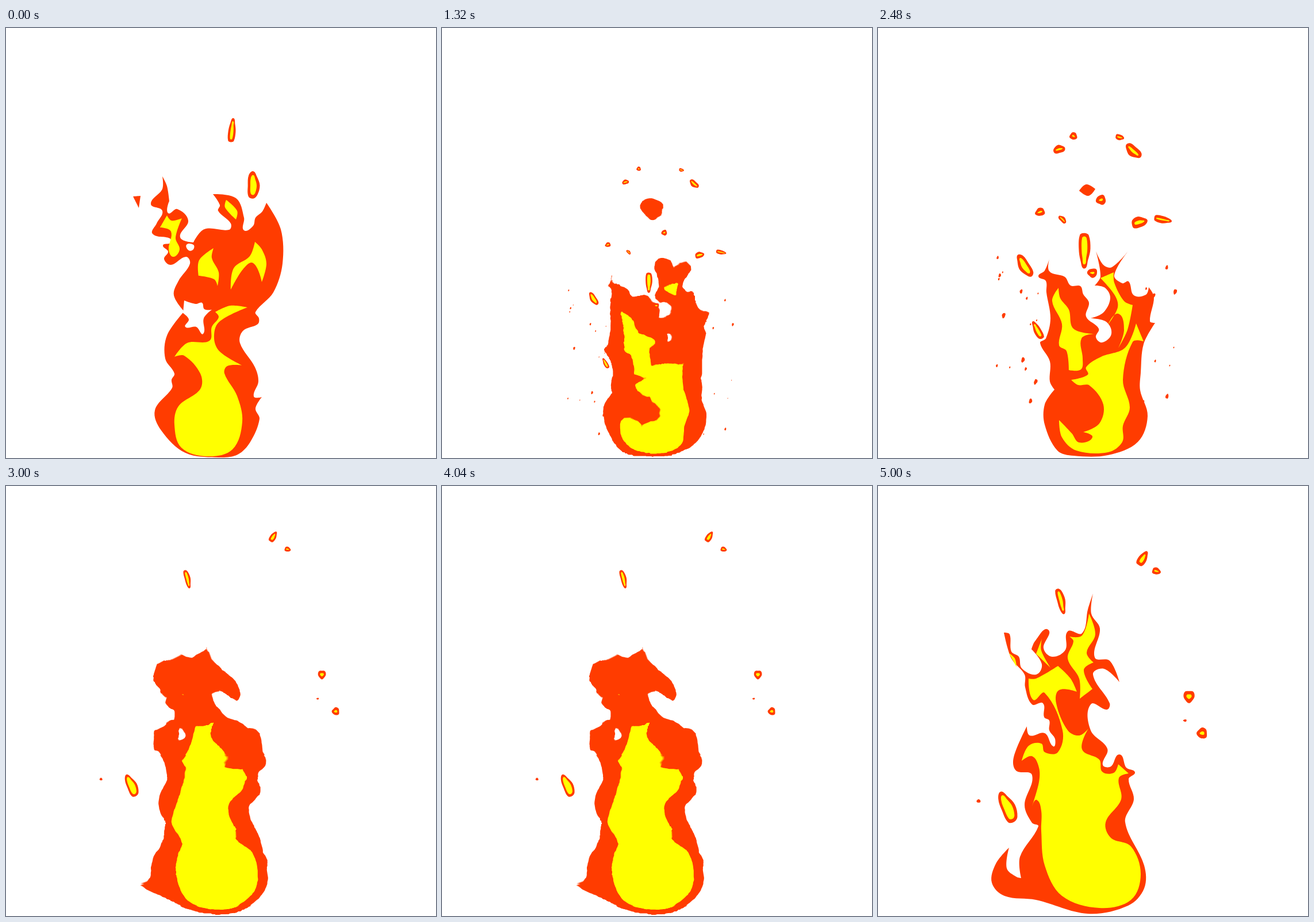
These frames come from a looping animation (748x748 px, 5.04 s). An HTML page with a canvas:

```html
<!DOCTYPE html>
<html lang="en">
<head>
<meta charset="utf-8">
<title>Flame</title>
<style>
  html, body { margin: 0; width: 100%; height: 100%; overflow: hidden; background: #fff; }
  canvas { display: block; width: 100vw; height: 100vh; }
</style>
</head>
<body>
<canvas id="stage" width="748" height="748"></canvas>
<script>
const SIZE = 748, HALF = 374, STEP = 40, LOOP = 5040, CYCLE = 26;
const RED = '#ff3c00', YELLOW = '#ffff00';

// Key drawings of one cycle. Outlines run smoothly through their points; "!" marks a corner.
// Embers: x,y,width,height,angle, shown from step "first" to "last" around the drawing.
const poses = [
  {
    at: 0, first: -1, last: 5, lift: 150, flecks: 0,
    red: [
      '453,304! 478,350 481,410 465,460 434,494 440,505 438,515 412,527 407,548 433,590 439,615 431,641 445,642! 434,662 441,680 425,720 403,742 370,747 312,739 270,700 259,665 289,626 288,612 293,601 277,575 280,535 310,493! 292,465 300,440 320,410 313,398 287,412 275,402 282,389 273,378 286,374 285,366 255,358 262,340 272,318 252,306 272,280 272,258! 280,275 284,301! 282,322 298,315 317,335 303,364 326,373! 345,350 388,351 391,340 369,318 372,308 360,289! 400,296 414,330 414,352 430,344 434,330 446,319',
      '221,293! 234,292! 231,313!'
    ],
    holes: [
      '314,377 326,377 326,385 318,387',
      '310,474! 330,480 341,478 345,489 358,490! 344,505 343,532 331,520 312,520 318,507 308,496!'
    ],
    yellow: [
      '361,383! 336,404 335,431! 362,437 368,449! 370,425 358,400',
      '433,372! 424,397 396,418 391,455! 412,420 430,409 445,442! 453,410 445,385',
      '383,299! 381,312 400,333! 402,318',
      '280,326! 268,347! 287,354 283,385 291,398 302,385 295,365 306,331! 288,335',
      '420,486! 370,512 362,540 372,563 411,587! 385,588 380,601 402,640 411,685 394,733 350,745 305,730 293,690 300,658 338,628 338,601 310,570 293,572! 315,548 354,544 358,520 370,503 364,494! 390,483'
    ],
    embers: '393,180,13,42,6 430,274,21,48,0'
  },
  {
    at: 10, first: -5, last: 6, lift: 170, flecks: 26,
    red: [
      '299,399! 298,423 325,433 335,448 352,449 357,463 367,478 362,502 384,523 379,538 390,547 406,532 397,511 370,505! 392,495 404,470 395,452 377,448! 387,432 379,388! 392,412 407,416 436,387! 411,430 425,444 436,441 445,465 466,464 471,451! 480,468 473,510 482,513! 462,550 457,600 456,630 469,675 452,720 400,743 340,744 312,735 290,690 290,655 307,629! 299,615 299,580 282,548 292,540 300,505 293,460 292,440 279,432 290,422',
      '350,283! 362,272 378,280! 366,292'
    ],
    holes: [],
    yellow: [
      '314,452! 317,470 332,490 340,523 376,532! 354,540 356,575 353,594 332,595! 328,562 315,552 320,515 303,475',
      '410,425! 411,443 428,475 443,482! 434,525 418,557! 428,525 418,497 400,516! 417,486 412,465 387,435!',
      '449,514! 462,545! 443,546 426,612 438,660 426,692 425,720 400,738 345,735 320,712 315,682! 337,705 350,721 373,712 357,703! 385,688 392,655 368,622 348,621 336,612! 365,603 362,590 388,572 430,556'
    ],
    embers: '315,211,21,14,-15 340,188,13,13,30 420,190,15,10,15 444,214,33,18,42 388,299,17,17,-20 282,320,17,14,-20 321,333,17,9,45 454,338,28,19,-15 494,333,31,13,12 359,384,20,62,0 373,426,17,16,0 255,414,19,44,-32 278,527,13,34,-28'
  },
  {
    at: 20, first: -5, last: 0, lift: 0, flecks: 0,
    red: [
      '334,171! 326,210 335,211! 338,235 364,285 350,310 364,319 373,345! 358,355 358,377 375,392 400,425 398,457 425,475 431,500 413,558 433,600 460,616 462,665 466,708 420,738 350,744 290,724 252,690 247,668 258,657 259,630 226,630! 253,613 224,575 229,560! 240,575 271,572 261,535 270,527 273,545 284,548 290,510 288,470 275,437 252,458 238,445 230,412 214,415! 224,390 224,343! 230,372 248,376 247,362 272,358 272,338 228,320 228,309 262,312 235,275 237,263 264,285 286,268 296,267 295,280 318,265 309,225 320,186! 322,196'
    ],
    holes: ['283,431! 315,452 316,490 303,490 304,465 292,460 298,455'],
    yellow: [
      '238,275! 268,295 283,279! 288,292 307,320 300,365 300,400 278,421! 276,392 260,370 280,362 280,330 245,316! 265,308',
      '233,375! 258,408 247,432! 242,408 226,400!',
      '321,200! 322,222 330,232 350,275 344,305 362,338 358,346! 345,328 312,319 310,283 322,262 311,222',
      '320,362! 350,366 373,418! 350,394 328,420 338,447 366,457 367,435! 397,465 425,500! 402,502 412,540 410,557 385,567 362,600 368,617 366,640 385,660 403,638 398,620 413,615 415,600 440,602 462,640 455,700 425,728 380,735 325,708 295,650 290,628 246,583! 278,583 280,558 298,545 300,510 335,517 348,490 322,435 320,405 327,385'
    ],
    embers: '284,46,12,6,5 191,81,21,8,-14 391,77,21,12,10 465,142,22,33,0 482,170,20,16,15 535,372,21,29,-15 530,410,8,7,0 556,434,22,27,0 171,436,5,6,0 195,474,5,6,0 181,556,10,13,0'
  },
  {
    at: 21, first: 0, last: 5, lift: 100, flecks: 0,
    red: [
      '374,187! 371,222 386,248 377,298 403,304 420,341! 393,318 374,328 403,378 398,389 370,380 370,425 399,457 391,485 405,488 420,467 432,490 447,498 436,510 445,545 430,585 463,660 463,700 435,730 365,744 275,720 220,713 198,690 205,657 228,629! 224,665 241,680 249,682! 247,645 279,592 268,586 255,555 268,503 240,495 236,472 259,418! 264,434 290,430 305,453 308,440 298,425 298,408 289,402 287,378 268,380 256,350 255,328 232,300 219,255! 229,258 232,288 245,297 250,317 275,328 285,310 267,284! 273,270 296,250 288,282 303,297 326,285 330,253 355,256 365,215'
    ],
    holes: [],
    yellow: [
      '313,313! 335,335 346,358! 315,355 310,378 330,425 350,434 366,422! 355,458 385,476 390,497 410,499 418,484! 436,500! 419,508 423,545 396,585 405,612 440,627 457,675 440,720 385,734 320,713 290,660 284,600 284,565 276,546 268,557! 280,515 280,490 268,470 250,478! 262,452 284,448 290,463 313,463 321,425 290,360 270,372 262,335! 275,335',
      '367,222! 378,258 363,290 375,307! 358,320 373,353! 351,370! 350,335 330,300 340,270 333,262! 355,260',
      '285,266! 284,286 300,316! 275,292!',
      '228,291! 238,300 241,315!'
    ],
    embers: '460,127,15,28,32 484,148,15,12,15 318,199,14,46,-14 541,366,19,21,0 534,408,6,4,0 564,430,18,19,0 175,548,7,6,0 226,560,25,58,-24'
  }
];

const ctx = document.getElementById('stage').getContext('2d');
const clamp = (v, lo, hi) => Math.min(hi, Math.max(lo, v));

function seeded(seed) {
  return () => (seed = seed * 16807 % 2147483647) / 2147483647;
}

function smooth(points) {
  const path = new Path2D(), n = points.length;
  const handle = (i, sign, length) => {
    const p = points[i], a = points[(i + n - 1) % n], b = points[(i + 1) % n];
    if (p.sharp) return [p.x, p.y];
    const dx = b.x - a.x, dy = b.y - a.y, k = sign * length / 3 / (Math.hypot(dx, dy) || 1);
    return [p.x + dx * k, p.y + dy * k];
  };
  path.moveTo(points[0].x, points[0].y);
  for (let i = 0; i < n; i++) {
    const j = (i + 1) % n, p = points[i], q = points[j];
    const length = Math.hypot(q.x - p.x, q.y - p.y);
    path.bezierCurveTo(...handle(i, 1, length), ...handle(j, -1, length), q.x, q.y);
  }
  path.closePath();
  return path;
}

const outline = text => smooth(text.split(' ').map(token => {
  const [x, y] = token.split(',').map(parseFloat);
  return { x, y, sharp: token.endsWith('!') };
}));

// Small flakes thrown off on both sides of the flame.
function scatter(count) {
  const random = seeded(41);
  return Array.from({ length: count }, (_, i) => {
    const x = i % 3 ? 205 + 75 * random() : 462 + 56 * random();
    const h = 3 + 8 * random() ** 2;
    return [x, 385 + 270 * random(), h * 0.6, h, 15];
  });
}

function fillRed(c, pose) {
  c.fillStyle = RED;
  pose.red.forEach(p => c.fill(p));
  c.globalCompositeOperation = 'destination-out';
  pose.holes.forEach(p => c.fill(p));
  c.globalCompositeOperation = 'source-over';
}

function fillYellow(c, pose) {
  c.fillStyle = YELLOW;
  pose.yellow.forEach(p => c.fill(p));
}

// Chamfer distance to the nearest cell where inside[i] equals value.
function distance(inside, value) {
  const d = new Float32Array(HALF * HALF);
  for (let i = 0; i < d.length; i++) d[i] = inside[i] === value ? 0 : 999;
  const sweep = s => {
    for (let m = 1; m < HALF - 1; m++) {
      for (let k = 1; k < HALF - 1; k++) {
        const i = s > 0 ? m * HALF + k : (HALF - 1 - m) * HALF + HALF - 1 - k;
        const up = i - s * HALF;
        d[i] = Math.min(d[i], d[i - s] + 1, d[up] + 1, d[up - 1] + 1.4, d[up + 1] + 1.4);
      }
    }
  };
  sweep(1);
  sweep(-1);
  return d;
}

// Signed distance field of a drawing, negative inside.
function field(pose, fill) {
  const c = new OffscreenCanvas(HALF, HALF).getContext('2d');
  c.scale(0.5, 0.5);
  fill(c, pose);
  const data = c.getImageData(0, 0, HALF, HALF).data;
  const inside = new Uint8Array(HALF * HALF);
  for (let i = 0; i < inside.length; i++) inside[i] = data[i * 4 + 3] > 127 ? 1 : 0;
  const out = distance(inside, 1), within = distance(inside, 0);
  return out.map((v, i) => clamp(v - within[i], -24, 24));
}

// Mixes two fields while both drift upwards, more so near the top.
function mix(a, b, k, lift) {
  const out = new Float32Array(HALF * HALF);
  for (let y = 0; y < HALF; y++) {
    const rise = (1 - y / HALF) * lift / 2;
    const ya = clamp(Math.round(y + k * rise), 0, HALF - 1) * HALF;
    const yb = clamp(Math.round(y - (1 - k) * rise), 0, HALF - 1) * HALF;
    for (let x = 0; x < HALF; x++) out[y * HALF + x] = a[ya + x] * (1 - k) + b[yb + x] * k;
  }
  return out;
}

function between(from, to, k) {
  const red = mix(from.redField, to.redField, k, from.lift);
  const yellow = mix(from.yellowField, to.yellowField, k, from.lift);
  const image = new ImageData(SIZE, SIZE), data = image.data;
  for (let y = 0, o = 0; y < SIZE; y++) {
    const v = clamp(y / 2 - 0.25, 0, HALF - 1.01), top = v | 0, fy = v - top;
    for (let x = 0; x < SIZE; x++, o += 4) {
      const u = clamp(x / 2 - 0.25, 0, HALF - 1.01), left = u | 0, fx = u - left;
      const i = top * HALF + left, j = i + HALF;
      const at = f => (f[i] * (1 - fx) + f[i + 1] * fx) * (1 - fy) + (f[j] * (1 - fx) + f[j + 1] * fx) * fy;
      const d = at(red), r = clamp(0.5 - 2 * d, 0, 1);
      const g = r && clamp(0.5 - 2 * Math.max(at(yellow), d + 1.5), 0, 1);
      data[o] = data[o + 3] = 255;
      data[o + 1] = 255 - 195 * r * (1 - g);
      data[o + 2] = 255 * (1 - r) * (1 - g);
    }
  }
  return image;
}

function blob(x, y, w, h, angle, seed) {
  const turn = angle * Math.PI / 180, cos = Math.cos(turn), sin = Math.sin(turn), points = [];
  for (let i = 0; i < 8; i++) {
    const a = i * Math.PI / 4, r = 0.5 + 0.06 * Math.sin(i * 2.4 + seed);
    const px = Math.cos(a) * w * r, py = Math.sin(a) * h * r;
    points.push({ x: x + px * cos - py * sin, y: y + px * sin + py * cos });
  }
  return smooth(points);
}

// Embers rise and spread at a steady pace, largest at their own drawing.
function drawEmbers(pose, phase) {
  let n = phase - pose.at;
  if (n > CYCLE / 2) n -= CYCLE;
  if (n < pose.first || n > pose.last) return;
  const scale = 1 - Math.abs(n) / 7;
  pose.embers.forEach(([x, y, w, h, angle], i) => {
    const cx = x + (x - 370) * 0.025 * n, cy = y - 19 * n, thin = Math.min(w, h);
    ctx.fillStyle = RED;
    ctx.fill(blob(cx, cy, w * scale, h * scale, angle, i));
    if (thin < 9) return;
    const rim = Math.min(10, thin * 0.6);
    ctx.fillStyle = YELLOW;
    ctx.fill(blob(cx, cy, (w - rim) * scale, (h - rim * 1.3) * scale, angle, i));
  });
}

for (const pose of poses) {
  for (const part of ['red', 'holes', 'yellow']) pose[part] = pose[part].map(outline);
  pose.embers = [...pose.embers.split(' ').map(row => row.split(',').map(Number)), ...scatter(pose.flecks)];
  pose.redField = field(pose, fillRed);
  pose.yellowField = field(pose, fillYellow);
}

const cache = [];
function draw(phase) {
  ctx.clearRect(0, 0, SIZE, SIZE);
  const i = poses.findLastIndex(p => p.at <= phase);
  const from = poses[i], to = poses[(i + 1) % poses.length];
  if (from.at === phase) {
    fillRed(ctx, from);
    fillYellow(ctx, from);
  } else {
    const k = (phase - from.at) / ((to.at || CYCLE) - from.at);
    cache[phase] ??= between(from, to, k);
    ctx.putImageData(cache[phase], 0, 0);
  }
  poses.forEach(p => drawEmbers(p, phase));
}

const start = performance.now();
let shown = -1;
function tick() {
  const step = Math.floor((performance.now() - start) % LOOP / STEP);
  if (step !== shown) draw((shown = step) % CYCLE);
  requestAnimationFrame(tick);
}
tick();
</script>
</body>
</html>
```
